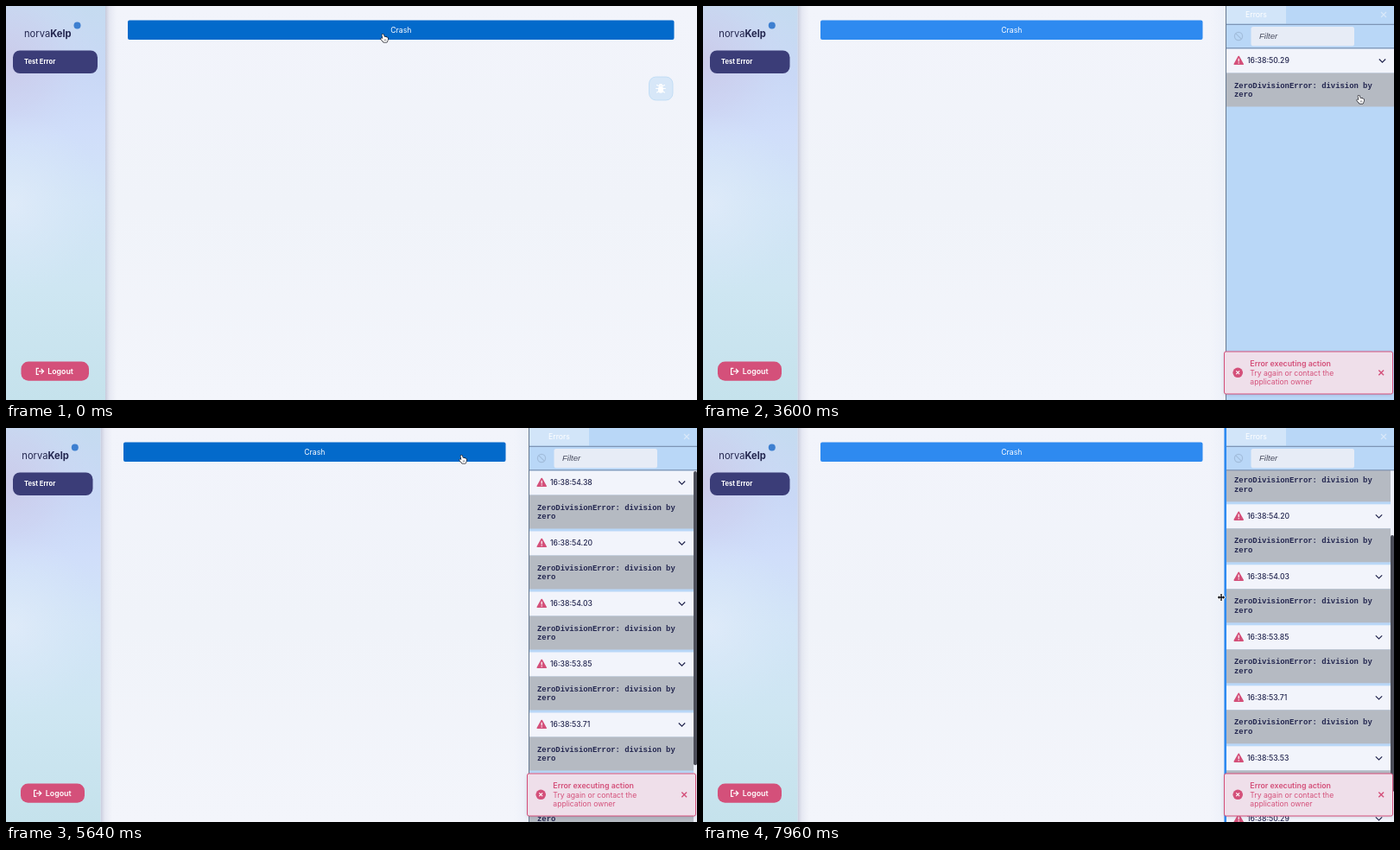
Animation of 800x456 px, one loop 8000 ms. Source, as an HTML page with a canvas:

```html
<!DOCTYPE html>
<html lang="en">
<head>
<meta charset="utf-8">
<title>Error panel demo</title>
<style>
  html, body { margin: 0; width: 100%; height: 100%; overflow: hidden; }
  canvas { display: block; width: 100%; height: 100%; }
</style>
</head>
<body>
<canvas id="stage" width="800" height="456"></canvas>
<script>
const ctx = document.getElementById('stage').getContext('2d');
const W = 800, H = 456, LOOP = 8000;
const SANS = 'Inter, sans-serif', MONO = '"Liberation Mono", monospace';
const INK = '#23264f', PINK = '#d4507a', BLUE = '#2e8af0', SKY = '#b9d7f7';
const PANEL_OPEN = 2800, TOAST_AT = 1470, ROW_H = 70, LIST_TOP = 49;

// [time shown, timestamp], oldest first
const errors = [
  [1470, '16:38:50.29'], [4690, '16:38:53.53'], [4870, '16:38:53.71'],
  [5010, '16:38:53.85'], [5180, '16:38:54.03'], [5360, '16:38:54.20'],
  [5540, '16:38:54.38'], [5730, '16:38:54.57']
];
// [time, x, y]
const cursorPath = [
  [0, 438, 37], [1960, 438, 37], [2480, 761, 101], [2880, 761, 101],
  [3080, 761, 108], [3660, 761, 108], [4180, 529, 36], [5720, 529, 36],
  [6200, 710, 148], [7540, 710, 148], [7820, 600, 196], [8000, 600, 196]
];
const scrollPath = [[6320, 0], [6360, 1.4], [6460, 52], [6560, 98.4], [6680, 101.2]];

const smooth = u => u * u * (3 - 2 * u);
const linear = u => u;

function track(keys, t, ease) {
  if (t <= keys[0][0]) return keys[0].slice(1);
  for (let i = 1; i < keys.length; i++) {
    const a = keys[i - 1], b = keys[i];
    if (t <= b[0]) {
      const u = ease((t - a[0]) / (b[0] - a[0]));
      return a.slice(1).map((v, k) => v + (b[k + 1] - v) * u);
    }
  }
  return keys[keys.length - 1].slice(1);
}

function rect(x, y, w, h, fill) {
  ctx.fillStyle = fill;
  ctx.fillRect(x, y, w, h);
}

function round(x, y, w, h, r, fill, stroke) {
  ctx.beginPath();
  ctx.roundRect(x, y, w, h, r);
  if (fill) { ctx.fillStyle = fill; ctx.fill(); }
  if (stroke) { ctx.strokeStyle = stroke; ctx.lineWidth = 1; ctx.stroke(); }
}

function text(str, x, y, font, fill, align = 'left') {
  ctx.font = font;
  ctx.fillStyle = fill;
  ctx.textAlign = align;
  ctx.fillText(str, x, y);
}

function line(points, color, width) {
  ctx.beginPath();
  points.forEach(([x, y], i) => i ? ctx.lineTo(x, y) : ctx.moveTo(x, y));
  ctx.strokeStyle = color;
  ctx.lineWidth = width;
  ctx.stroke();
}

function disc(x, y, r, fill) {
  ctx.beginPath();
  ctx.arc(x, y, r, 0, Math.PI * 2);
  ctx.fillStyle = fill;
  ctx.fill();
}

function cross(x, y, r, color, width) {
  line([[x - r, y - r], [x + r, y + r]], color, width);
  line([[x + r, y - r], [x - r, y + r]], color, width);
}

function fade(grad, stops) {
  stops.forEach(([at, color]) => grad.addColorStop(at, color));
  return grad;
}

function drawSidebar(open) {
  const edge = open ? 109.5 : 115;
  rect(edge, 0, 14, H, fade(ctx.createLinearGradient(edge, 0, edge + 14, 0), [
    [0, 'rgba(150,155,185,.48)'], [.35, 'rgba(175,180,205,.2)'], [1, 'rgba(200,205,225,0)']
  ]));
  rect(0, 0, edge, H, fade(ctx.createLinearGradient(0, 0, 0, H), [
    [0, '#c5dbf0'], [.18, '#c9d8f6'], [.32, '#d0defa'], [.5, '#d2e5f7'],
    [.72, '#cee6f2'], [1, '#c5e2ec']
  ]));
  rect(0, 0, edge, 230, fade(ctx.createRadialGradient(0, 65, 0, 0, 65, 110), [
    [0, 'rgba(204,199,230,.8)'], [.5, 'rgba(205,207,238,.5)'], [1, 'rgba(208,220,248,0)']
  ]));
  rect(0, 110, edge, 240, fade(ctx.createRadialGradient(8, 230, 0, 8, 230, 105), [
    [0, 'rgba(224,235,249,.85)'], [1, 'rgba(216,232,247,0)']
  ]));

  const shift = open ? -2.7 : 0;
  text('norva', 21 + shift, 36, '400 11.2px ' + SANS, INK);
  const nameW = ctx.measureText('norva').width;
  text('Kelp', 21 + shift + nameW, 36, '700 11.2px ' + SANS, INK);
  disc(82.5 + shift, 22.5, 4, '#3d7fd0');

  round(8, 51.5, edge - 17, 26.5, 8, '#3b3d78');
  text('Test Error', 21, 67.3, '700 7.6px ' + SANS, '#fff');

  const x = open ? 17 : 17.5;
  round(x, 411.5, open ? 74 : 78.5, 22.3, 8.5, PINK);
  const ix = open ? 32 : 34.7;
  line([[ix + 3.3, 419.3], [ix + .6, 419.3], [ix + .6, 426.3], [ix + 3.3, 426.3]], '#fff', 1.2);
  line([[ix + 3, 422.8], [ix + 8.6, 422.8]], '#fff', 1.2);
  line([[ix + 6, 420], [ix + 8.8, 422.8], [ix + 6, 425.6]], '#fff', 1.2);
  text('Logout', open ? 45.8 : 48.2, 426, '600 8.8px ' + SANS, '#fff');
}

function drawCrash(open, hover) {
  const x = open ? 136 : 141, w = open ? 442.5 : 632.5;
  round(x, 16.5, w, 22.5, 2, hover ? '#036acb' : BLUE);
  text('Crash', x + w / 2, 31.2, '400 8.7px ' + SANS, '#fff', 'center');
}

function drawBug(hover) {
  ctx.globalAlpha = hover ? 1 : .75;
  round(744.5, 82, 27.5, 27, 8, hover ? '#bcdcf8' : '#cde3f7', '#b9d9f3');
  ctx.globalAlpha = 1;
  ctx.lineCap = 'round';
  for (const s of [-1, 1]) {
    line([[758, 95.5], [758 + s * 5.3, 95.5]], '#fff', 1.2);
    line([[758, 93.5], [758 + s * 4.5, 91.5]], '#fff', 1.2);
    line([[758, 97.5], [758 + s * 4.5, 100]], '#fff', 1.2);
  }
  ctx.lineCap = 'butt';
  round(755, 92.8, 6, 8, 3, '#fff');
  round(755.7, 90, 4.6, 2.3, [2.3, 2.3, 0, 0], '#fff');
}

function drawRow(y, stamp, right) {
  rect(606, y + .5, right - 606, 28, '#f2f4fb');
  rect(606, y + 28.5, right - 606, 39, '#b5bac2');
  const c = y + 14;
  ctx.beginPath();
  ctx.moveTo(620.2, c - 4.5);
  ctx.lineTo(625.2, c + 4.3);
  ctx.lineTo(615.2, c + 4.3);
  ctx.closePath();
  ctx.lineJoin = 'round';
  ctx.lineWidth = 1.6;
  ctx.fillStyle = ctx.strokeStyle = PINK;
  ctx.fill();
  ctx.stroke();
  ctx.lineJoin = 'miter';
  rect(619.6, c - 2.2, 1.2, 3.6, '#fff');
  rect(619.6, c + 2.4, 1.2, 1.2, '#fff');
  text(stamp, 630, c + 3.3, '500 8.6px ' + SANS, INK);
  const cx = right - 13.5;
  line([[cx - 3.7, c - 1.5], [cx, c + 2.2], [cx + 3.7, c - 1.5]], INK, 1.2);
  const mono = '700 8.9px ' + MONO;
  text('ZeroDivisionError: division by', 615, y + 45.5, mono, INK);
  text('zero', 615, y + 56.3, mono, INK);
}

function drawPanel(t, resizing) {
  rect(588, 0, 17, H, fade(ctx.createLinearGradient(588, 0, 605, 0), [
    [0, 'rgba(225,232,246,0)'], [1, 'rgba(225,232,246,.35)']
  ]));
  rect(605, 0, 195, H, SKY);

  const rows = errors.filter(e => e[0] <= t).reverse();
  const view = H - LIST_TOP, total = rows.length * ROW_H - 3;
  const overflow = total > view, right = overflow ? 796 : W;
  const [scroll] = track(scrollPath, t, linear);
  ctx.save();
  ctx.beginPath();
  ctx.rect(605, LIST_TOP, 195, view);
  ctx.clip();
  rows.forEach((row, i) => drawRow(LIST_TOP + i * ROW_H - scroll, row[1], right));
  if (overflow) {
    rect(796, LIST_TOP, 4, view, '#eceff7');
    const k = view / total;
    round(796, LIST_TOP + 1 + scroll * k, 4, view * k, 2, '#4b4d58');
  }
  ctx.restore();

  rect(606, 0, 69, 20.5, '#d2e5f9');
  text('Errors', 640.5, 13.2, '400 8.7px ' + SANS, '#fff', 'center');
  cross(788, 10, 3, '#d9e8f9', 1.1);
  rect(605, 20.8, 195, 1, '#7186a6');
  rect(605, 48.3, 195, 1, '#7186a6');
  ctx.beginPath();
  ctx.arc(620, 35, 4.6, 0, Math.PI * 2);
  ctx.strokeStyle = '#a2bddb';
  ctx.lineWidth = 1.2;
  ctx.stroke();
  line([[616.8, 31.8], [623.2, 38.2]], '#a2bddb', 1.2);
  round(634.5, 24, 119.5, 22.3, 2.5, '#e7ecf6');
  text('Filter', 644, 38.2, 'italic 400 9.6px "Liberation Sans", sans-serif', '#4b4f61');

  if (resizing) rect(603.4, 0, 2.6, H, BLUE);
  else rect(605, 0, 1, H, '#66788f');
}

function drawToast(t) {
  const u = Math.min(1, (t - TOAST_AT + 40) / 200);
  ctx.save();
  ctx.globalAlpha = smooth(u);
  ctx.shadowColor = 'rgba(90,80,120,.25)';
  ctx.shadowBlur = 4;
  ctx.shadowOffsetY = 1;
  round(603.5, 400, 195, 49, 2, '#efdfea');
  ctx.shadowColor = 'transparent';
  round(603.5, 400, 195, 49, 2, null, PINK);
  disc(619.2, 424.3, 5.8, PINK);
  cross(619.2, 424.3, 1.9, '#fff', 1.2);
  text('Error executing action', 633.3, 417, '600 8.8px ' + SANS, PINK);
  text('Try again or contact the', 633.3, 427.6, '400 8.6px ' + SANS, PINK);
  text('application owner', 633.3, 438, '400 8.6px ' + SANS, PINK);
  cross(785.2, 424.3, 2.9, PINK, 1.4);
  ctx.restore();
}

function outlined(d, fill, stroke, width) {
  const p = new Path2D(d);
  ctx.lineJoin = 'round';
  ctx.strokeStyle = stroke;
  ctx.lineWidth = width;
  ctx.stroke(p);
  ctx.fillStyle = fill;
  ctx.fill(p);
  ctx.lineJoin = 'miter';
}

function drawCursor(x, y, kind) {
  ctx.save();
  ctx.translate(x, y);
  if (kind === 'hand') {
    outlined('M-2.6 -3.8Q-1.7 -5 -.9 -3.8L0 -1.1Q.7 -1.8 1.5 -.9Q2.4 -1.4 2.9 -.4Q4.1 -.7 4.1 .7' +
      'L3.7 3.3L2.9 4.8H-.8L-3.8 1.4Q-4.1 .2 -3 .3L-1.7 1.1Z', '#fff', '#15151c', 1.3);
    for (const k of [0, 1.5]) line([[k + .2, 1.5], [k + .4, 3.3]], '#15151c', .5);
  } else if (kind === 'resize') {
    outlined('M-.7 -4H.7V-.7H2.2V-2L4.2 0L2.2 2V.7H.7V4H-.7V.7H-2.2V2L-4.2 0L-2.2 -2V-.7H-.7Z',
      '#0c0c12', '#fff', 1.6);
  } else {
    outlined('M-2 -5V4L0 2.2L1.3 5L2.6 4.4L1.4 1.7H4Z', '#000', '#fff', 1.2);
  }
  ctx.restore();
}

function draw(t) {
  const open = t >= PANEL_OPEN;
  const [x, y] = track(cursorPath, t, smooth);
  const tipY = y - 5;
  const onCrash = tipY < 39 && x > 136 && x < (open ? 578 : 773);
  const onBug = !open && x > 745 && tipY > 82 && tipY < 110;
  const shown = errors.filter(e => e[0] <= t).length;
  const onRow = open && x > 606 && tipY > LIST_TOP && tipY < LIST_TOP + shown * ROW_H;
  const resizing = open && t > 7500 && x <= 606;

  rect(0, 0, W, H, fade(ctx.createLinearGradient(0, 0, 0, H), [
    [0, '#f2f4fb'], [.5, '#f0f3f9'], [1, '#f3f5fb']
  ]));
  drawSidebar(open);
  drawCrash(open, onCrash);
  if (open) drawPanel(t, resizing);
  else drawBug(onBug);
  if (t >= TOAST_AT) drawToast(t);
  drawCursor(x, y, resizing ? 'resize' : onCrash || onBug || onRow ? 'hand' : 'arrow');
}

const start = performance.now();
function tick() {
  draw((performance.now() - start) % LOOP);
  requestAnimationFrame(tick);
}
tick();
</script>
</body>
</html>
```
